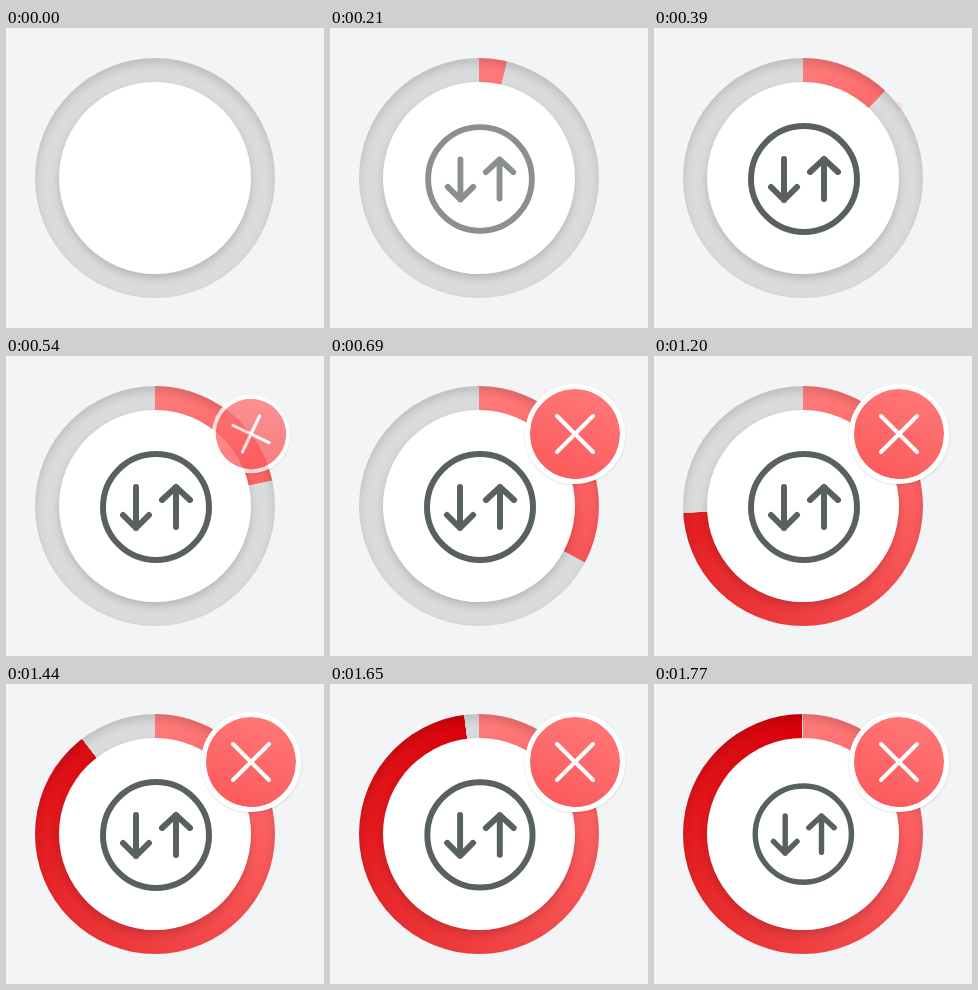
An HTML page for the animation above (1.8 s loop, 318 by 300 pixels).

```html
<!DOCTYPE html>
<html lang="en">
<head>
<meta charset="utf-8">
<title>Progress ring</title>
<style>
html, body { margin: 0; width: 100%; height: 100%; overflow: hidden; background: #f3f4f6; }
div, svg { position: absolute; }
#ring {
  left: 29px; top: 30px; width: 240px; height: 240px; border-radius: 50%;
  --angle: 0deg;
  background:
    conic-gradient(transparent var(--angle), #dadbdd calc(var(--angle) + .25deg)),
    conic-gradient(#ff7b7b, #fb5e5f 25%, #ef3f41 50%, #e31b1f 75%, #d8000a);
  box-shadow: inset 0 5px 10px rgba(0, 0, 0, .14);
}
#disc {
  left: 53px; top: 54px; width: 192px; height: 192px; border-radius: 50%;
  background: #fff; box-shadow: 0 4px 8px rgba(0, 0, 0, .17);
}
svg { left: 0; top: 0; fill: none; stroke-linecap: round; stroke-linejoin: round; }
#badge {
  left: 195px; top: 28px; width: 90px; height: 90px; border-radius: 50%;
  border: 5px solid #fff; background: linear-gradient(200deg, #ff7a7a, #fb5759) padding-box;
  box-shadow: 0 1px 3px rgba(0, 0, 0, .13);
}
</style>
</head>
<body>
<div id="ring"></div>
<div id="disc"></div>
<svg width="318" height="300">
  <g id="icon" stroke="#596060" stroke-width="6">
    <circle r="53"/>
    <path d="M-20-20V21M-33 8L-20 21L-7 8M20 20V-20M6-7L20-20L34-7"/>
  </g>
</svg>
<div id="badge">
  <svg width="90" height="90"><path d="M27 27L63 63M63 27L27 63" stroke="#fff" stroke-width="4"/></svg>
</div>
<script>
const LOOP = 1800, STEP = 30;
const [ring, icon, badge] = ['ring', 'icon', 'badge'].map(id => document.getElementById(id));
const span = (t, from, to) => Math.min(1, Math.max(0, (t - from) / (to - from)));
const smooth = u => u * u * (3 - 2 * u);

function draw(now) {
  const t = Math.floor(now % LOOP / STEP) * STEP;
  ring.style.setProperty('--angle', 360 * smooth(t / LOOP) - .25 + 'deg');

  // The icon fades in while growing, then shrinks before the loop restarts.
  const grow = smooth(span(t, 0, 300)), shrink = smooth(span(t, 1620, LOOP));
  icon.setAttribute('opacity', span(t, 0, 300));
  icon.setAttribute('transform',
    `translate(${150 - .7 * shrink} ${151 - shrink}) scale(${.9 + .1 * (grow - shrink)})`);

  const pop = smooth(span(t, 330, 630));
  badge.style.opacity = pop;
  badge.style.transform = `rotate(${90 * (pop - 1)}deg) scale(${pop})`;
  requestAnimationFrame(draw);
}
draw(performance.now());
</script>
</body>
</html>
```
